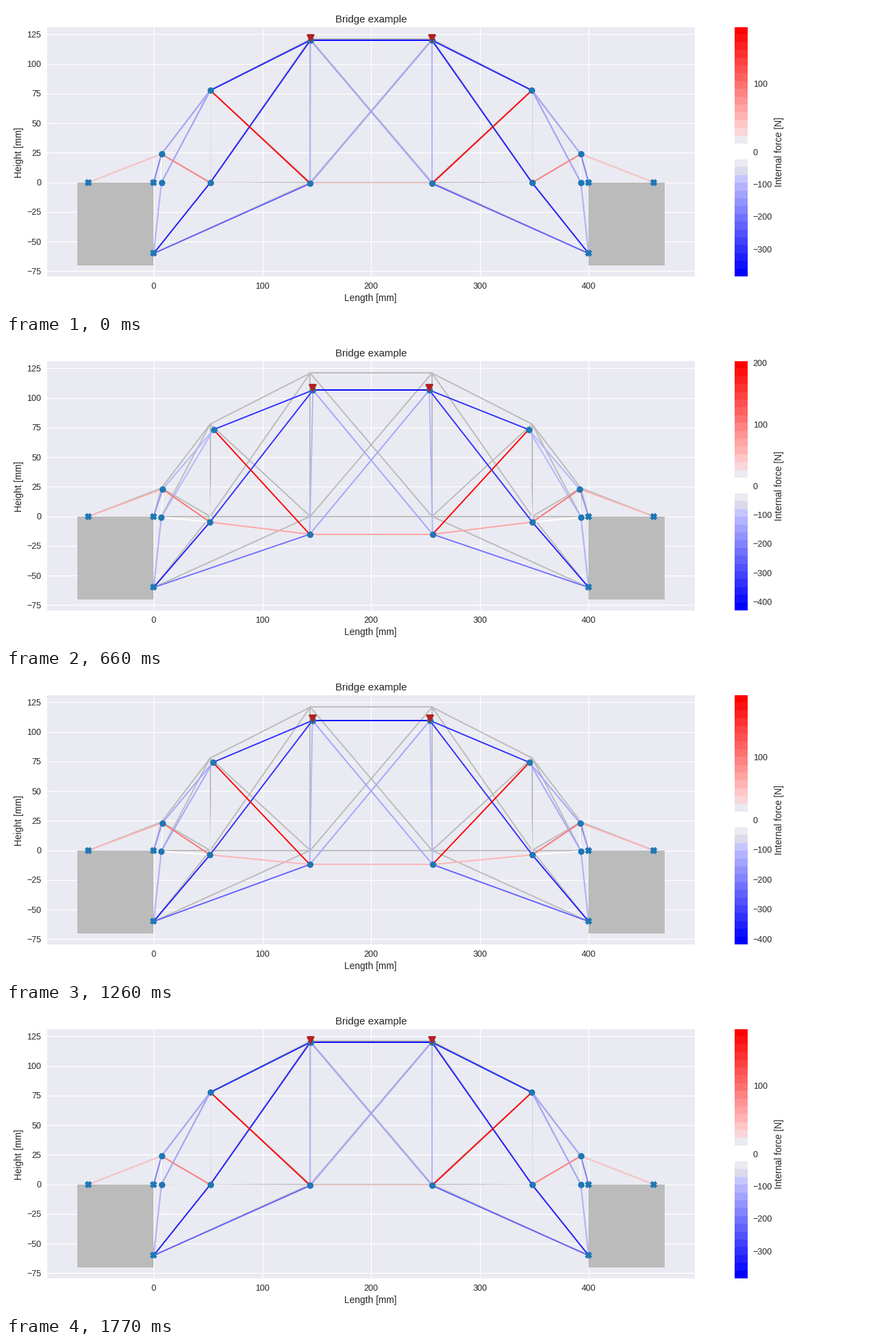
Animation, 1252 px wide and 447 px high, one loop 1800 ms. Source, as a matplotlib script:

```python
import matplotlib.pyplot as plt
import numpy as np
from matplotlib.animation import FuncAnimation
from matplotlib.collections import LineCollection
from matplotlib.patches import Rectangle

W, H = 1252, 447
LEFT, RIGHT, TOP, BOTTOM = 60, 1003.5, 31, 395
X0, Y0, SX, SY = 215.2, 257.7, 1.585, 1.7296   # pixel origin and pixels per mm
HALF = 30                                      # load steps, played up and back
LEVELS = 32
INK, PANEL, STONE, BLUE = "#262626", "#eaeaf2", "#bbbbbb", "#1f77b4"

plt.rcParams.update({
    "font.family": "Liberation Sans", "font.size": 12.5,
    "text.color": INK, "xtick.color": INK, "ytick.color": INK,
    "axes.unicode_minus": True,
})

# left half: x, y and displacement at full load, in mm
NODES = {
    "A": (-60, 0, 0, 0),
    "B": (0, 0, 0, 0),
    "C": (0, -60, 0, 0),
    "D": (7.2, 24, 1.2, -1.25),
    "E": (7.2, 0, -0.2, -0.85),
    "F": (52, 78, 3.8, -5.65),
    "G": (52, 0, -0.25, -5.8),
    "H": (144, 121, 3.0, -17.4),
    "I": (144, 0, -0.6, -18.3),
}
FIXED, FREE = "ABC", "DEFGHI"

# ends, relative force at the first step, change per step
MEMBERS = [
    ("A", "D", 0.245, 0.0022),
    ("B", "D", -0.465, 0.0018),
    ("C", "E", -0.28, 0),
    ("D", "E", 0.01, 0),
    ("E", "G", -0.08, 0.0055),
    ("D", "F", -0.335, 0.0012),
    ("E", "F", -0.335, 0.0012),
    ("F", "G", 0.09, 0),
    ("D", "G", 0.485, 0.002),
    ("C", "I", -0.61, 0.0025),
    ("C", "G", -0.86, 0),
    ("G", "I", 0.115, 0.0098),
    ("H", "I", -0.28, 0),
    ("H", "i", -0.34, 0.0012),
    ("G", "H", -0.825, 0.0017),
    ("F", "H", -0.825, 0.0017),
    ("F", "I", 1, 0),
]
CENTRE = [("I", "i", 0.13, 0.0098), ("H", "h", -1, 0)]


def mirrored(member):
    a, b, force, slope = member
    return a.swapcase(), b.swapcase(), force, slope


TRUSS = MEMBERS + [mirrored(m) for m in MEMBERS] + CENTRE


def place(load):
    """Node positions; lower-case names are the mirrored half."""
    pos = {}
    for name, (x, y, dx, dy) in NODES.items():
        px, py = x + dx * load, y + dy * load
        pos[name] = px, py
        pos[name.lower()] = 400 - px, py
    return pos


def segments(pos):
    return [(pos[a], pos[b]) for a, b, *_ in TRUSS]


def palette():
    colors = plt.get_cmap("bwr")(np.linspace(0, 1, LEVELS))[:, :3]
    mid = LEVELS // 2
    colors[mid - 1:mid + 1] = 1
    colors[[mid - 2, mid + 1]] = np.array([234, 234, 242]) / 255
    colors[mid - 3] = np.array([218, 218, 234]) / 255
    colors[mid + 2] = np.array([248, 214, 217]) / 255
    return colors


COLORS = palette()


def shade(force):
    level = int(np.floor((1 + force) * LEVELS / 2))
    return COLORS[min(max(level, 0), LEVELS - 1)]


def add_axes(fig, left, right, **kw):
    box = [left / W, 1 - BOTTOM / H, (right - left) / W, (BOTTOM - TOP) / H]
    ax = fig.add_axes(box, **kw)
    for spine in ax.spines.values():
        spine.set_visible(False)
    ax.tick_params(length=0, pad=8.75)
    return ax


def label(fig, x, y, text, angle=0):
    fig.text(x / W, 1 - y / H, text, size=13.75, rotation=angle,
             rotation_mode="anchor", ha="center", va="baseline")


# at 72 dpi one point is one pixel
fig = plt.figure(figsize=((W + 1e-6) / 72, (H + 1e-6) / 72), dpi=72,
                 facecolor="white")

ax = add_axes(fig, LEFT, RIGHT, facecolor=PANEL)
ax.set_xlim((LEFT - X0) / SX, (RIGHT - X0) / SX)
ax.set_ylim((Y0 - BOTTOM) / SY, (Y0 - TOP) / SY)
ax.set_xticks(range(0, 401, 100))
ax.set_yticks(range(-75, 126, 25))
ax.set_axisbelow(True)
ax.grid(color="white", lw=1.25)
ax.set_title("Bridge example", size=15, pad=7)
label(fig, 531.5, 431, "Length [mm]")
label(fig, 23, 214, "Height [mm]", 90)

for x in (-70, 400):
    ax.add_patch(Rectangle((x, -70), 70, 70, fc=STONE, lw=0, zorder=1.5))

rest = place(0)
ax.add_collection(LineCollection(segments(rest), colors=STONE, lw=1.9,
                                 capstyle="round", zorder=2), autolim=False)
bars = LineCollection(segments(rest), lw=1.9, capstyle="round", zorder=3)
ax.add_collection(bars, autolim=False)


def dots(marker, color, size, zorder):
    return ax.plot([], [], marker, color=color, ms=size, mew=1.875,
                   zorder=zorder)[0]


joints = dots("o", BLUE, 7.5, 4)
supports = dots("X", BLUE, 7.5, 4)
loads = dots("v", "firebrick", 10, 5)
supports.set_data(*zip(*(rest[n] for n in FIXED + FIXED.lower())))

scale = add_axes(fig, 1062, 1080)
scale.imshow(COLORS[:, None, :], extent=(0, 1, -1, 1), origin="lower",
             aspect="auto", interpolation="nearest")
scale.set_xticks([])
scale.yaxis.tick_right()
scale.tick_params(length=0, pad=8.75)
label(fig, 1130.5, 213.5, "Internal force [N]", 90)


def update(frame):
    step = min(frame, 2 * HALF - 1 - frame)
    pos = place((step + 1.5) / 28.5)

    bars.set_segments(segments(pos))
    bars.set_color([shade(f + slope * step) for _, _, f, slope in TRUSS])
    joints.set_data(*zip(*(pos[n] for n in FREE + FREE.lower())))
    loads.set_data(*zip(*((pos[n][0], pos[n][1] + 3.2 / SY) for n in "Hh")))

    pull, push = 182.6 + 0.9 * step, 384 + 2.02 * step
    forces = [f for f in range(-400, 201, 100) if -push <= f <= pull]
    scale.set_yticks([f / (pull if f > 0 else push) for f in forces],
                     [str(f).replace("-", "\u2212") for f in forces])
    return bars, joints, loads


anim = FuncAnimation(fig, update, frames=2 * HALF, interval=30,
                     init_func=lambda: update(0), repeat=True, repeat_delay=0,
                     blit=False)
plt.show()
```
